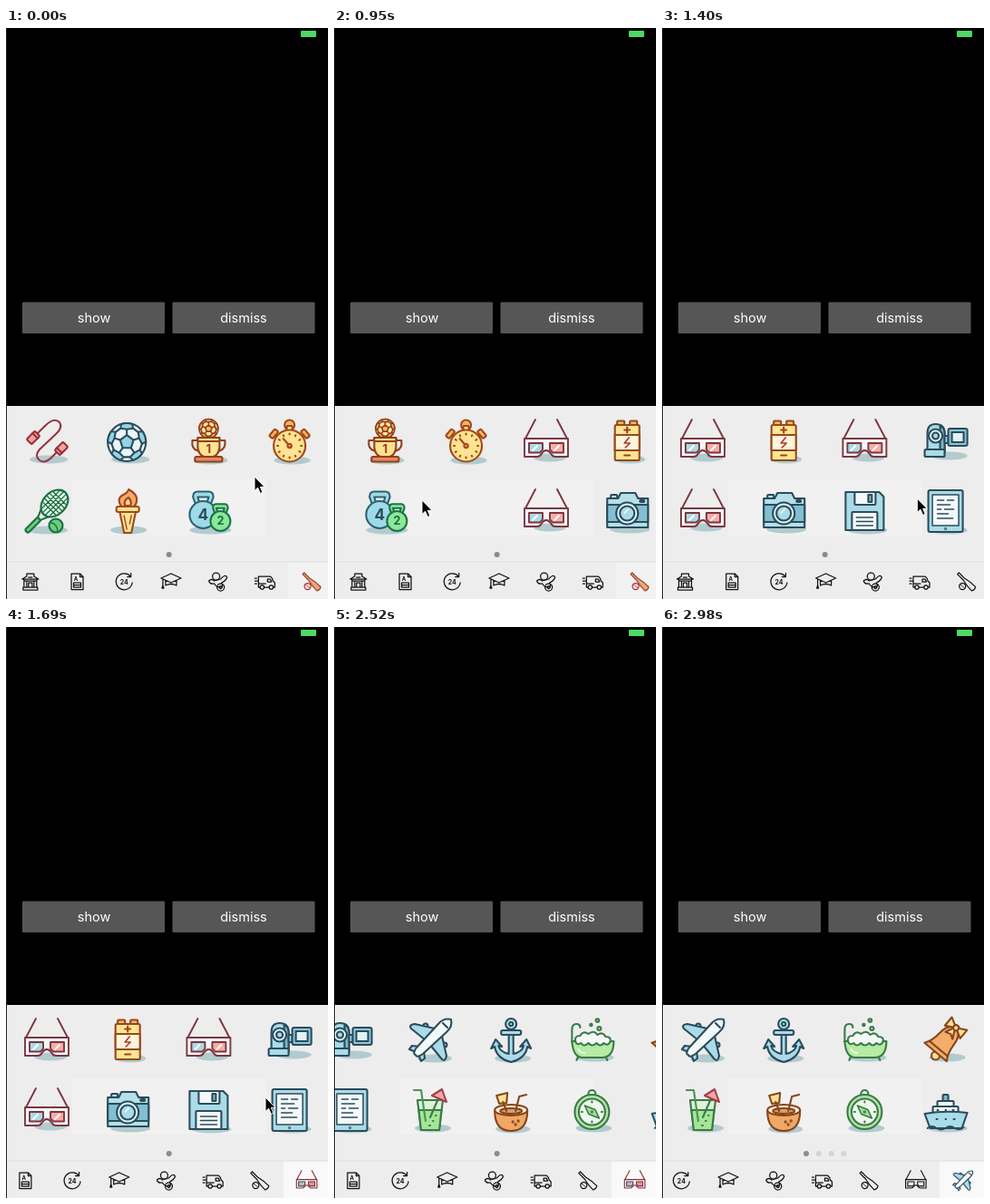
These frames come from a looping animation (355 px wide and 630 px high, 4230 ms). An HTML page:

```html
<!DOCTYPE html>
<html lang="en">
<head>
<meta charset="utf-8">
<title>Sticker keyboard</title>
<style>
  html, body { margin: 0; width: 100%; height: 100%; overflow: hidden; background: #000; }
  svg { display: block; }
  text { font-family: Inter, Roboto, sans-serif; text-anchor: middle; }
  .icon { stroke-width: 2.1; stroke-linejoin: round; stroke-linecap: round; }
  .icon text, .tab text { stroke: none; font-weight: 700; }
  .shade { fill: #b2cbce; stroke: none; }
  .tab { fill: none; stroke: #111; stroke-width: 1.25; stroke-linejoin: round; stroke-linecap: round; }
</style>
</head>
<body>
<svg width="355" height="630" viewBox="0 0 355 630">
  <rect width="355" height="630"/>
  <rect width="1" height="630" fill="#222"/>
  <rect x="325" y="3" width="17" height="7" rx="1" fill="#4cd964"/>
  <g fill="#565656">
    <rect x="18" y="302.5" width="157" height="34.5" rx="1"/>
    <rect x="183.5" y="302.5" width="157" height="34.5" rx="1"/>
  </g>
  <g fill="#fff" font-size="14.5">
    <text x="97" y="325">show</text>
    <text x="262" y="325">dismiss</text>
  </g>
  <clipPath id="panel"><rect x="1" y="417" width="354" height="213"/></clipPath>
  <g clip-path="url(#panel)">
    <rect y="417" width="355" height="213" fill="#ededed"/>
    <rect x="73" y="498" width="214" height="62" fill="#f1f1f1"/>
    <g id="strip"></g>
    <g id="dots"></g>
    <rect y="588.5" width="355" height="1" fill="#e2e2e2"/>
    <g id="tabs"></g>
  </g>
  <path id="cursor" d="M0,0V15.5L3.6,12.2L6.3,18.4L8.9,17.3L6.3,11.3H11Z" stroke="#fff"/>
</svg>
<script>
const $ = id => document.getElementById(id);
const LOOP = 4230, START = 710, TICK = 58.2;
const PAGE = 356, COL = 89.2, CELL = 51.7;

const navy = '#2b4c5c', ice = '#a9dce8', rust = '#a0491c', gold = '#ffe292',
      wine = '#7d3540', leaf = '#3a7b47', mint = '#b5eba3', snow = '#f4f8f8';

// Shape helpers
const fillOf = f => f ? ` fill="${f}"` : '';
const path = (d, f, more = '') => `<path d="${d}"${fillOf(f)} ${more}/>`;
const line = (d, more) => path(d, 'none', more);
const circle = (x, y, r, f) => `<circle cx="${x}" cy="${y}" r="${r}"${fillOf(f)}/>`;
const rect = (x, y, w, h, r = 0, f = '') =>
  `<rect x="${x}" y="${y}" width="${w}" height="${h}" rx="${r}"${fillOf(f)}/>`;
const shade = (x, y, rx, ry = 4.5) => `<ellipse class="shade" cx="${x}" cy="${y}" rx="${rx}" ry="${ry}"/>`;
const label = (s, x, y, size, f) => `<text x="${x}" y="${y}" font-size="${size}" fill="${f}">${s}</text>`;
const turn = (deg, x, y, body) => `<g transform="translate(${x} ${y}) rotate(${deg})">${body}</g>`;
const polar = (r, deg) => {
  const a = deg * Math.PI / 180;
  return `${(r * Math.sin(a)).toFixed(1)},${(-r * Math.cos(a)).toFixed(1)}`;
};
const ring = (n, fn) => Array.from({ length: n }, (_, i) => fn(i * 360 / n)).join('');
const icon = (stroke, fill, body) => `<g class="icon" stroke="${stroke}" fill="${fill}">${body}</g>`;

function soccer(r, base, patch) {
  const pent = 'M' + [0, 72, 144, 216, 288].map(a => polar(r * .37, a)).join('L') + 'Z';
  return circle(0, 0, r, base) + path(pent, patch) + ring(5, a =>
    line(`M${polar(r * .37, a)}L${polar(r * .68, a)}M${polar(r * .8, a + 24)}L${polar(r * .8, a + 48)}`) +
    path(`M${polar(r * .68, a)}L${polar(r * .8, a + 24)}L${polar(r, a + 17)}` +
         `A${r},${r} 0 0 0 ${polar(r, a - 17)}L${polar(r * .8, a - 24)}Z`, patch));
}

function kettlebell(r, n, tone) {
  return path(`M${-r * .5},${-r * .6}L${-r * .75},${-r * 1.3}Q${-r * .75},${-r * 1.7} ${-r * .4},${-r * 1.7}` +
    `H${r * .4}Q${r * .75},${-r * 1.7} ${r * .75},${-r * 1.3}L${r * .5},${-r * .6}Z`) +
    path(`M${-r * .25},${-r * .8}L${-r * .4},${-r * 1.3}H${r * .4}L${r * .25},${-r * .8}Z`, '#ededed') +
    circle(0, 0, r) + label(n, 0, r * .4, r * 1.15, tone);
}

const glassesBody = (frame, left, right) =>
  line('M-23,-3L-12,-24M23,-3L12,-24') +
  path('M-24,-3H24V17H10Q7,17 5.5,14Q3,10 0,10Q-3,10 -5.5,14Q-7,17 -10,17H-24Z', frame) +
  path('M-19,2H-4V9L-7,12.5H-19Z', left) + path('M19,2H4V9L7,12.5H19Z', right);

// Each half of the plane mirrors the other across its axis
const planeHalf = circle(-5, -16, 2.5) +
  path('M5,-13L-17,-18Q-24,-17 -21,-13L-5,0ZM-11,7L-20,6L-23,10L-13,14Z');
const planeBody = planeHalf + `<g transform="matrix(0 -1 -1 0 0 0)">${planeHalf}</g>` +
  path('M23,-23Q15,-25 9,-18L-15,8Q-20,15 -16,16Q-15,20 -8,15L18,-9Q25,-15 23,-23Z', snow) +
  line('M14,-19L19,-14');

const handle = rect(-6.5, -4, 13, 8, 1.5) + line('M3,-4V4');
const button = rect(-5, -3, 10, 5, 1.5, '#f5b45c') + line('M0,2V5');

const icons = {
  rope: icon('#96323f', '#f3a29b', shade(2, 20, 21) +
    line('M-10,-9L-2,-17Q8,-27 14,-21Q18,-15 10,-8L-8,9Q-14,16 -8,21Q-2,25 5,18L11,12') +
    turn(-45, -15, -4, handle) + turn(135, 16, 8, handle)),
  ball: icon(navy, ice, shade(3, 20, 21) + turn(0, -1, 1, soccer(21, '#eaf5f8', '#92d3e5'))),
  trophy: icon('#94401a', gold, shade(2, 21, 19) +
    `<g stroke-width="1.6">${turn(0, 0, -14, soccer(10.5, '#ffe9ac', '#f6b968'))}</g>` +
    line('M-11,-1H-18V4Q-17,10 -9,11M11,-1H18V4Q17,10 9,11') +
    path('M-12,-4H12V7Q11,15 5,17H-5Q-11,15 -12,7Z') + rect(-12, -4, 24, 4, 1) +
    rect(-15, 17, 30, 5.5, 1.5, '#e58a63') + label(1, 0, 13, 13, '#94401a')),
  watch: icon(rust, gold, shade(3, 21, 20) + circle(0, -18, 5.5, '#f5b45c') + rect(-3, -17, 6, 6, 1) +
    turn(-50, -17, -8, button) + turn(50, 17, -8, button) +
    circle(0, 5, 17.5) + turn(0, 0, 5, ring(12, a => line(`M${polar(12.5, a)}L${polar(13.5, a)}`))) +
    line('M0,5L-7,-3') + circle(0, 5, 2.2, '#f0a24a')),
  racket: icon('#176f40', '#69cf7b', shade(1, 21, 22) + turn(45, 0, 0,
    rect(-2.5, 11, 5, 21, 2) + path('M-8,-2L-2,12H2L8,-2Z', '#ededed') +
    `<ellipse cy="-12" rx="12.500" ry="17" fill="#e7f4e8"/>` +
    line('M-6,-26V1M-2,-28V4M2,-28V4M6,-26V1M-10,-20H10M-11,-16H11M-12,-12H12M-11,-8H11M-10,-4H10', 'stroke-width="1.3"')) +
    circle(10, 16, 7.5) + line('M5,13Q11,14 12,22', 'stroke-width="1.3"')),
  torch: icon(rust, gold, shade(1, 21, 20) +
    path('M-7,-5Q-13,-14 -5,-18Q0,-20 1,-24Q10,-19 10,-13Q10,-8 7,-5Z', '#f7a96c') +
    path('M-3,-6Q-5,-12 1,-15Q5,-10 3,-6Z', '#ffd28a') +
    path('M-9,0L-4,24H4L9,0Z') + rect(-12.5, -5, 25, 6, 2) + line('M-4,5L-1,20M4,5L2,14', 'stroke-width="1.4"')),
  weights: icon('#2c6273', '#9fdae8', shade(2, 21, 23) + turn(0, -6, 4, kettlebell(15, 4, navy)) +
    `<g stroke="#1c7445" fill="#8be79a">${turn(0, 13, 11, kettlebell(11, 2, '#176f40'))}</g>`),
  glasses: icon(wine, snow, `<g stroke-width="1.900">${shade(4, 18, 18) + glassesBody(snow, '#aadbe5', '#f8aca5') +
    line('M-15,10L-10,5M9,10L14,5', 'stroke="#fff"')}</g>`),
  battery: icon('#97481a', '#ffe594', shade(3, 20, 17) + rect(-11, -22.5, 8, 5, 1, '#f3b564') + rect(3, -22.5, 8, 5, 1, '#f3b564') +
    rect(-13.5, -18, 27, 39, 1.5) + rect(-13.5, -7, 27, 17, 0, '#fff4dc') +
    line('M-3,-12.5H3M0,-15.500V-9.500M-3,15.500H3') + line('M2,-4L-3,2H3L-2,7', 'stroke="#b23a34" stroke-width="1.7"')),
  camcorder: icon(navy, ice, shade(4, 16, 20) + path('M-20,12V-9Q-20,-19 -11,-19Q-1,-19 -1,-9V12Z') +
    path('M-1,-9V12H-6V-17Q-1,-15 -1,-9Z', '#7bb7c8') + rect(-23, 9, 22, 8, 1.5) +
    circle(-11, -6, 7.5, '#dff2f6') + circle(-11, -6, 3.5) + rect(-1, -6, 4, 8, 1) +
    rect(3, -14, 21, 19, 2, '#8bc6d6') + rect(7, -10, 13, 11, 0, '#e1f3f7')),
  camera: icon(navy, '#b5e0e9', shade(3, 20, 22) + path('M-22,-14H-10L-7,-20H9L12,-14H23V18H-22Z') +
    rect(-18, -18, 7, 4, 1) + rect(-22, -7, 45, 19, 0, '#83bfd0') + circle(0, 2.5, 12, '#dff2f6') +
    circle(0, 2.5, 8, ice) + line('M-3,2L1,-2', 'stroke="#fff" stroke-width="1.5"') + rect(14, -12, 5, 2, 1, '#fff')),
  floppy: icon(navy, ice, shade(3, 21, 22) + path('M-21,-21H16L21,-16V21H-21Z') +
    rect(-11, -21, 23, 14, 1, snow) + rect(4, -18, 4, 8, 0, '#7fb9ca') + rect(-14, 1, 28, 20, 1, snow) +
    line('M-9,7H9M-9,11.500H9M-9,16H9', 'stroke-width="1.6"')),
  tablet: icon(navy, ice, shade(3, 21, 21) + rect(-19, -23, 38, 46, 2) +
    `<g stroke-width="1.500">${rect(-14.5, -18, 29, 34, 0, snow) +
    line('M-9,-12H-2M2,-12H9M-9,-7H5M-9,-2H-5M-1,-2H9M-9,3H3M-9,8H8')}</g>` + circle(0, 19.5, .5)),
  plane: icon(navy, ice, shade(5, 20, 19) + planeBody),
  anchor: icon(navy, ice, shade(2, 20, 20) + circle(0, -18, 6) + circle(0, -18, 2, '#ededed') +
    rect(-11, -11, 22, 5, 2) +
    path('M-2.5,-6H2.5V15Q12,13 14,6L10,7L17,-1L22,9L18,7Q16,20 0,24Q-16,20 -18,7L-22,9L-17,-1L-10,7L-14,6Q-12,13 -2.5,15Z')),
  bath: icon(leaf, mint, shade(3, 19, 21) + line('M-22,2V-12Q-22,-18 -17,-18Q-13,-18 -13,-14') +
    line('M-15,18L-17,22M15,18L17,22') + path('M-22,1H24Q24,18 12,19H-11Q-21,18 -22,1Z') +
    path('M-18,2Q-20,-5 -13,-5Q-10,-11 -4,-7Q2,-12 6,-6Q12,-10 15,-4Q22,-4 20,2Q17,7 13,3Q9,8 5,3Q0,8 -4,3Q-9,8 -12,3Q-16,6 -18,2Z', snow) +
    line('M-15,10Q-13,14 -8,14', 'stroke="#fff" stroke-width="1.5"') +
    circle(-1, -17, 1.2) + circle(6, -22, 1.8) + circle(8, -13, 2)),
  bell: icon('#87451d', '#f2ae69', shade(2, 19, 20) + circle(-11, 17, 4.5, gold) +
    turn(40, 0, 0, path('M-16,17Q-11,11 -10,-3Q-9,-17 0,-17Q9,-17 10,-3Q11,11 16,17Z') +
      line('M-13,12H13') + path('M0,-18L-11,-24V-12ZM0,-18L11,-24V-12Z', gold) +
      path('M-1,-18L-6,-7L0,-9L5,-6Z', gold) + circle(0, -18, 3, gold))),
  drink: icon(leaf, mint, shade(3, 20, 20) + path('M-14,-11H14L10,22H-10Z', '#dcf3d8') +
    path('M-12.5,0H12.5L10,22H-10Z', '#a5e598') + line('M-5,12L-10,-22H-18', 'stroke="#4b9357"') +
    line('M0,8L10,-15') + path('M2,-16L13,-23L18,-9Z', '#f6a5ab', 'stroke="#a2404a"') + line('M3,12H3.500M6,6H6.500M-1,17H0')),
  coconut: icon('#87451d', '#f0a866', shade(2, 21, 19) + path('M-16,-16L-4,-19L-5,-8L-13,-7Z', gold) +
    path('M-18,1H18Q18,23 0,23Q-18,23 -18,1Z') +
    `<ellipse rx="18" ry="6" fill="#fff1d8"/><ellipse cy="1" rx="12" ry="3" fill="#dba069"/>` +
    line('M-9,-9L-5,1M5,1L9,-15L17,-17') + circle(2, 13, .6) + circle(8, 12, .6) + circle(5, 16, .6)),
  compass: icon(leaf, '#b1e2a6', shade(2, 20, 20) + circle(0, -18, 4, '#ededed') + circle(0, 2, 19) + circle(0, 2, 14.5, '#eef8ea') +
    turn(0, 0, 2, ring(4, a => line(`M${polar(10.5, a)}L${polar(11.5, a)}`)) +
      path('M-8,-7L3.5,-2.5L8,7L-3.5,2.5Z', '#a5dd9b', 'stroke-width="1.7"') + circle(0, 0, .6))),
  ship: icon(navy, ice, shade(2, 20, 22) + rect(-3, -17, 6, 8, 1, '#7fb9ca') + rect(-9, -10, 18, 7, 1, snow) +
    rect(-14, -4, 28, 8, 1, snow) + path('M-23,4Q0,0 24,3L18,20H-17Z') +
    line('M-9,0H-8M0,0H.5M8,0H9M-10,10H-9M0,10H.5M9,10H10') +
    line('M-20,20Q-15,16 -10,20Q-5,23 0,20Q5,16 10,20Q15,23 20,19', 'stroke-width="1.8"')),
};

const pages = [
  ['rope ball trophy watch', 'racket torch weights'],
  ['glasses battery glasses camcorder', 'glasses camera floppy tablet'],
  ['plane anchor bath bell', 'drink coconut compass ship'],
];
$('strip').innerHTML = pages.map((rows, p) => rows.map((row, r) => row.split(' ').map((name, c) =>
  turn(0, 45 + p * PAGE + c * COL, 456 + r * 77, icons[name])).join('')).join('')).join('');

// Tab bar
const batBody = (wood, ball, seam) =>
  turn(45, 0, 0, path('M-13,-1.2H-4Q4,-3.2 11,-3Q13,0 11,3Q4,3.2 -4,1.2H-13Z', wood)) +
  `<g ${seam}>${circle(-4.5, 5, 3.5, ball)}${line('M-6.5,3.5L-2.5,6.5', 'stroke-width=".8"')}</g>`;
const small = (stroke, body) =>
  `<g transform="scale(.47)" stroke="${stroke}" fill="${ice}" stroke-width="2.4">${body}</g>`;

const tabs = [
  path('M-9,-3L-4,-6V-9H4V-6L9,-3ZM-7,-3V6M7,-3V6M-4,-1V6M4,-1V6M-8,6H8V9H-8ZM-2,6V1H2V6M-7,-1H7M-2,-5H2'),
  path('M-6.5,-9H3L6.5,-5.5V8.5H-6.5ZM3,-9V-5.5H6.5M-4,1H4V6H-4ZM-4,3.5H4') + label('A', -1.5, -1.5, 6, '#111'),
  path('M7,-6A9,9 0 1 0 9,1M7.5,-9.5V-5.5H3.5') + label('24', 0, 2.6, 7, '#111'),
  path('M-11,-4L0,-9L11,-4L0,1ZM-6,-1.5V4Q0,1 6,4V-1.5M-9,-3V4M-9,4L-10,7H-8Z'),
  circle(-2, -6, 4) + path('M-10,-1Q-7,-4 -4,-1L3,-3Q8,-9 10,-5Q9,-1 4,1Q6,4 4,6Q-1,7 -4,2Q-9,3 -10,-1Z') + circle(3, 6, 4) + circle(3, 6, 1.5),
  path('M-7,-6H5Q8,-6 9,-1L11,1V6H-7ZM3,-3H6L7.5,0H3ZM-7,2H1M-11,-4H-9M-11,-1H-8M-11,2H-9') + circle(-3, 6, 2.2, '#ededed') + circle(7, 6, 2.2, '#ededed'),
  [batBody('none', '#ededed', ''), `<g stroke="#97472f">${batBody('#eba678', '#f8e3e0', 'stroke="#b0303a"')}</g>`],
  [small('#111', glassesBody('none', 'none', 'none')), small(wine, glassesBody(snow, '#8fd0df', '#f28e88'))],
  ['', small(navy, planeBody)],
];
$('tabs').innerHTML = `<rect id="lit" y="590" width="${CELL}" height="40"/>` + tabs.map((t, i) => {
  const states = [].concat(t);
  return `<g class="tab" transform="translate(${1 + CELL * (i + .5)} 611)">` +
    (states[1] ? `<g id="off${i}">${states[0]}</g><g id="on${i}">${states[1]}</g>` : states[0]) + '</g>';
}).join('');

const dotsFor = n => Array.from({ length: n }, (_, i) =>
  circle(179.7 + (i - (n - 1) / 2) * 13.8, 581, 3, i ? '#d4d4d4' : '#8b8b8b')).join('');
$('dots').innerHTML = `<g id="one">${dotsFor(1)}</g><g id="four">${dotsFor(4)}</g>`;

const show = (id, on) => $(id).setAttribute('visibility', on ? 'visible' : 'hidden');
const move = (id, x, y = 0) => $(id).setAttribute('transform', `translate(${x.toFixed(2)} ${y.toFixed(2)})`);
const part = (k, from, to) => Math.min(1, Math.max(0, (k - from) / (to - from)));
const smooth = (k, from, to) => { const u = part(k, from, to); return u * u * (3 - 2 * u); };
const easeOut = (k, from, to) => { const u = part(k, from, to); return u * (2 - u); };

function draw(t) {
  const k = Math.floor((t - START) / TICK + .2);
  const drag1 = smooth(k, -1, 4), drag2 = smooth(k, 22, 26);
  const scroll = Math.max(0, 177 * drag1 - 10) + 189 * easeOut(k, 5, 11.87) +
                 Math.max(0, 175 * drag2 - 23) + 204 * easeOut(k, 28, 34.62);
  const page = (k > 11) + (k > 34);
  move('strip', -scroll);
  move('tabs', -57.2 * smooth(k, 11.5, 17) - CELL * smooth(k, 34.5, 39));
  $('lit').setAttribute('x', 1 + CELL * (6 + page));
  $('lit').setAttribute('fill', page ? '#f9f9f9' : '#f2f2f2');
  for (let i = 6; i < 9; i++) {
    show('on' + i, page === i - 6);
    show('off' + i, page !== i - 6);
  }
  show('one', page < 2);
  show('four', page === 2);
  const back = easeOut(k, 5, 13.3);
  move('cursor', 274 - 177 * drag1 + 189 * back - 175 * drag2, 495 + 26 * drag1 - 2 * back + 15 * drag2);
  show('cursor', k < 29);
}

function frame() {
  draw(performance.now() % LOOP);
  requestAnimationFrame(frame);
}
frame();
</script>
</body>
</html>
```
